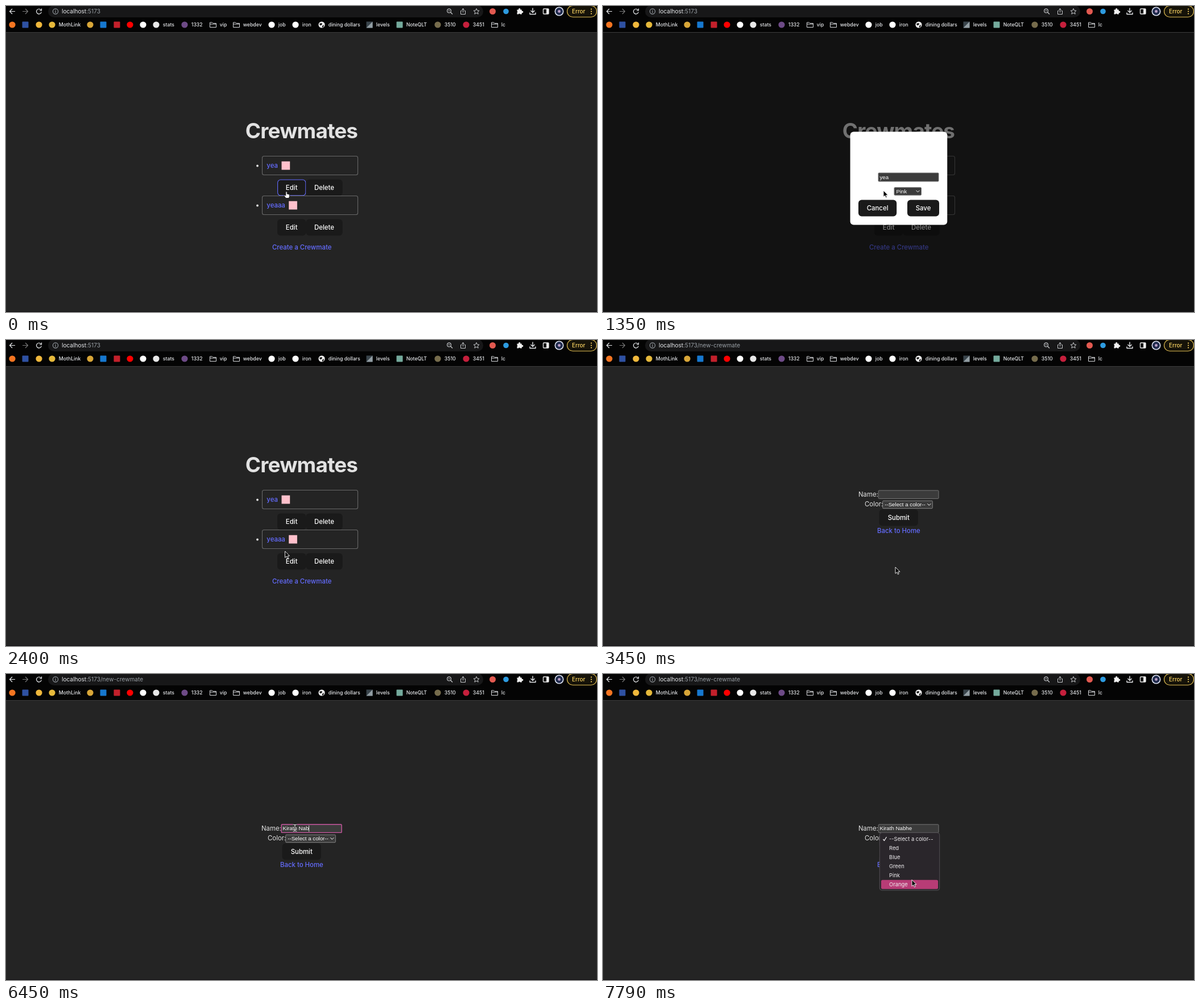
An HTML page that plays this animation: 1039x539 px, repeating every 8 s.

```html
<!DOCTYPE html>
<html lang="en">
<head>
<meta charset="utf-8">
<title>Crewmates</title>
<style>
  html, body { margin: 0; width: 100%; height: 100%; overflow: hidden; background: #242424; }
  svg { display: block; position: absolute; left: 0; top: 0; }
  text { font: 11.4px Inter, sans-serif; fill: #e2e2e2; white-space: pre; }
  .strong { font-weight: 500; }
  .button { font-weight: 500; fill: #fff; text-anchor: middle; }
  .link { font-weight: 500; fill: #646cff; }
  .link.hover { fill: #535bf2; }
  .title { font-size: 36.8px; font-weight: 700; letter-spacing: -.022em; text-anchor: middle; }
  .url { font-size: 10.1px; fill: #9aa0a6; }
  .bookmark { font-size: 8.7px; font-weight: 500; fill: #e8eaed; }
  .field { font: 9.7px "Liberation Sans", Arial, sans-serif; fill: #fff; }
  .option { font-size: 9.4px; fill: #f0eef0; }
</style>
</head>
<body>
<svg width="1039" height="539" viewBox="0 0 1039 539">
  <rect width="1039" height="539" fill="#242424"/>
  <g id="page"></g>
  <g id="chrome"></g>
</svg>
<script>
const LOOP = 8000;
const PINK = '#cc58a2', BLUE = '#646cff';
const byId = id => document.getElementById(id);

const text = (x, y, s, cls = '') => `<text x="${x}" y="${y}" class="${cls}">${s}</text>`;
const rect = (x, y, w, h, fill, r = 0, stroke = 'none', sw = 1) =>
  `<rect x="${x}" y="${y}" width="${w}" height="${h}" rx="${r}" fill="${fill}" stroke="${stroke}" stroke-width="${sw}"/>`;
const circle = (x, y, r, fill, stroke = 'none') =>
  `<circle cx="${x}" cy="${y}" r="${r}" fill="${fill}" stroke="${stroke}" stroke-width="1.1"/>`;
const path = (x, y, d, stroke = '#e8eaed', fill = 'none', sw = 1.2) =>
  `<path transform="translate(${x} ${y})" d="${d}" stroke="${stroke}" fill="${fill}" stroke-width="${sw}" stroke-linejoin="round"/>`;

// Browser toolbar and bookmarks
const ARROW = 'M5 0H-4M0-4.5L-4.5 0 0 4.5';
const FOLDER = 'M-5.5-4H-1.5L0-2.5H5.5V4.5H-5.5ZM-5.5-1H5.5';

const icons = {
  dot: (x, c) => circle(x, 33, 5.6, c),
  box: (x, c) => rect(x - 5.5, 27.5, 11, 11, c, 1),
  folder: x => path(x, 33, FOLDER, '#d5d7da', 'none', 1),
  globe: x => circle(x, 33, 5.6, '#f1f1f1') +
    path(x, 33, 'M-4-2L0-3 1-1-1 1-3 1ZM1 2L4 0 3 4 1 5Z', 'none', '#111'),
  picture: x => rect(x - 5.5, 27.5, 11, 11, '#39444b') +
    path(x, 33, 'M-5.5 5.5L5.5-5.5V5.5Z', 'none', '#929da3'),
};

const bookmarks = [
  ['dot', 11, '#f47521'], ['box', 34, '#2e51a2'], ['dot', 58, '#f0b83c'],
  ['dot', 81, '#e6b93b', 'MothLink'], ['dot', 148, '#d8a638'], ['box', 171, '#1678cf'],
  ['box', 195, '#c3202b'], ['dot', 218, '#f00'], ['dot', 241, '#fff'],
  ['dot', 264, '#e8e8e8', 'stats'], ['dot', 314, '#6d4a86', '1332'],
  ['folder', 364, '', 'vip'], ['folder', 405, '', 'webdev'],
  ['dot', 467, '#fff', 'job'], ['dot', 509, '#fff', 'iron'],
  ['globe', 555, '', 'dining dollars'], ['picture', 639, '', 'levels'],
  ['box', 692, '#74aa9c', 'NoteQLT'], ['dot', 759, '#766c4c', '3510'],
  ['dot', 809, '#c51f3c', '3451'], ['folder', 859, '', 'lc'],
];

const toolbar = route => rect(0, 0, 1039, 46, '#040404') + rect(0, 46, 1039, 1, '#3c3c3c') +
  rect(74, -1, 765, 21, '#171718', 10.5) +
  `<text x="98" y="13.2" class="url"><tspan fill="#e8eaed">localhost</tspan>:5173${route}</text>`;

const toolbarIcons =
  path(11, 9.5, ARROW) + path(34, 9.5, 'M-5 0H4M0-4.5L4.5 0 0 4.5', '#777') +
  path(58, 9.5, 'M3.5-2.5A4.4 4.4 0 1 0 4.3 1M4.5-5V-1.5H1', '#e8eaed') +
  circle(87, 9.5, 4.6, 'none', '#9aa0a6') + path(87, 9.5, 'M0-.5V2.5M0-2.5V-1.3', '#9aa0a6') +
  circle(779, 8.5, 3.4, 'none', '#c8cacd') + path(779, 8.5, 'M-1.6 0H1.6M2.5 2.5L6 6', '#c8cacd') +
  path(803.5, 9.5, 'M-2-1H-4V5H4V-1H2M0 2V-5M-2.3-2.7L0-5 2.3-2.7', '#c8cacd', 'none', 1) +
  path(827, 9.5, 'M0-5L1.5-1.6 5-1.3 2.3 1 3.2 4.7 0 2.7-3.2 4.7-2.3 1-5-1.3-1.5-1.6Z', '#c8cacd', 'none', 1) +
  circle(855.5, 9.5, 5.5, '#e25950') + circle(879, 9.5, 4.8, '#2d9be0') +
  path(903, 9.5, 'M-4.5-3H-1.8A1.7 1.7 0 1 1 1.2-3H3.8V-.5A1.7 1.7 0 1 1 3.8 2.5V5H1A1.6 1.6 0 0 0-2 5H-4.5V2A1.6 1.6 0 0 0-4.5-.6Z', 'none', '#f1f1f1') +
  path(926, 9.5, 'M0-6V2M-3.5-1.5L0 2 3.5-1.5M-5 2V5H5V2', '#e8eaed', 'none', 1.4) +
  rect(944.5, 5, 9.5, 9, 'none', 1, '#f1f1f1', 1.3) + rect(950, 5, 4, 9, '#f1f1f1') +
  circle(972.5, 9.5, 8, '#dfe5f3') + circle(972.5, 9.5, 6.4, '#202b4d') + circle(972.5, 9.5, 2.4, '#b99fc7') +
  rect(986.5, -.5, 52, 20, '#161309', 10, '#d9b64e', 1.2) +
  '<text x="995" y="13" class="strong" style="font-size:9.9px;fill:#fdd663">Error</text>' +
  [5.5, 9.5, 13.5].map(y => circle(1029, y, 1.1, '#fdd663')).join('') +
  bookmarks.map(([kind, x, color, label]) =>
    icons[kind](x, color) + (label ? text(x + 11.8, 36.2, label, 'bookmark') : '')).join('');

// Page widgets
const button = (x, y, w, label, ring) =>
  rect(x, y, w, 29, '#1a1a1a', 5.7) +
  (ring ? rect(x + .6, y + .6, w - 1.2, 27.8, 'none', 5.2, ring, ring === PINK ? 1.4 : 1.1) : '') +
  text(x + w / 2, y + 18.6, label, 'button');

const box = (x, y, w, h, stroke = '#767676', sw = 1) => rect(x, y, w, h, '#3b3b3b', 1.2, stroke, sw);

const select = (x, y, w, label, stroke) => box(x, y, w, 13.5, stroke) +
  text(x + 3.5, y + 10.2, label, 'field') +
  path(x + w - 6, y + 6.6, 'M-3-1.5L0 1.5 3-1.5', '#fff', 'none', 1);

const crewRow = (y, name, swatchX, ring) =>
  circle(442, y + 17.5, 1.9, '#e2e2e2') + rect(450.5, y + .5, 168, 33, 'none', 3, '#686868', 1.1) +
  text(458.3, y + 21.3, name, 'link') + rect(swatchX, y + 9.7, 14.7, 14.8, '#ffc0cb') +
  button(477, y + 41.4, 50.4, 'Edit', ring) + button(527.4, y + 41.4, 64.2, 'Delete');

const homePage = s =>
  text(519.5, 232.6, 'Crewmates', 'title') +
  crewRow(264, 'yea', 484.5, s.edit) + crewRow(334, 'yeaaa', 497.2) +
  text(468, 429.3, 'Create a Crewmate', s.hover ? 'link hover' : 'link') +
  (s.modal ? modal(s) : '');

const modal = s =>
  rect(0, 47, 1039, 492, 'rgba(0,0,0,.5)') + rect(434.6, 221.6, 170.6, 164, '#fff', 6) +
  box(484, 294, 106, 15) + text(486.5, 304.6, 'yea', 'field') +
  select(512, 319.7, 47.5, 'Pink') +
  (s.cancel ? rect(448.3, 340.8, 68.6, 31, '#1a1a1a', 6) : '') +
  button(449, 341.5, 67.2, 'Cancel', s.cancel) + button(535, 341.5, 56, 'Save');

const pen = document.createElement('canvas').getContext('2d');
pen.font = '9.7px "Liberation Sans", Arial, sans-serif';

const formPage = s =>
  text(449, 275.5, 'Name:') + text(460, 293.4, 'Color:') +
  box(484.2, 265, 105.8, 14.4, s.focus ? PINK : '#767676', s.focus ? 1.4 : 1) +
  text(486.5, 275.4, s.name, 'field') +
  (s.caret ? rect(486.5 + pen.measureText(s.name).width, 266.8, .8, 11, '#fff') : '') +
  select(491.7, 283.2, 87.6, '--Select a color--', s.over ? '#a0a0a0' : '#858585') +
  button(485.6, 298.3, 68.4, 'Submit') + text(482, 340.2, 'Back to Home', 'link') +
  (s.row >= 0 ? menu(s.row) : '');

const menu = row =>
  rect(486.3, 279.5, 105.4, 101.5, '#2a262b', 4, '#59555a', .9) +
  rect(489, 282.8 + row * 16, 100, 16, '#b83c76', 2.5) +
  ['--Select a color--', 'Red', 'Blue', 'Green', 'Pink', 'Orange']
    .map((label, i) => text(503, 294 + i * 16, label, 'option')).join('') +
  path(495.5, 290.5, 'M-3 .5L-1 3 3-3.5', '#f0eef0', 'none', 1.3);

const cursors = {
  arrow: (x, y) => path(x, y, 'M0 0V11.3L2.7 8.9 4.4 12.8 6.2 12 4.6 8.2H8Z', '#fff', '#000', .9),
  hand: (x, y) => path(x, y, 'M-1.2 .5Q0-1 1.2 .5V4Q5 3.8 5.5 6V8.5L4.2 11.5H-1L-3.8 7.5Q-4.2 5.5-2.6 6L-1.2 7.2Z', '#111', '#fff', .9),
  beam: (x, y) => [['#111', 2.4], ['#eee', 1.1]].map(([c, w]) =>
    path(x, y, 'M-3.5-6Q0-6 0-4V4Q0 6-3.5 6M3.5-6Q0-6 0-4M3.5 6Q0 6 0 4M-2 2.5H2', c, 'none', w)).join(''),
};

// Each step changes only what it names; everything else carries over.
const at = (cursor, x, y) => ({ cursor, x, y });
const steps = [
  [0, { ...at('hand', 493, 327), edit: BLUE }],
  [150, { edit: PINK }],
  [1200, at('arrow', 493, 325)],
  [1350, { modal: true }],
  [1650, at('arrow', 492, 329)],
  [1800, at('arrow', 490, 336)],
  [1950, { ...at('hand', 487, 347), cancel: BLUE }],
  [2100, at('hand', 485, 351)],
  [2250, { cancel: PINK }],
  [2400, { ...at('arrow', 490.5, 372), modal: false, edit: '' }],
  [2550, at('arrow', 491, 376)],
  [2700, at('arrow', 501, 398)],
  [2850, { ...at('hand', 513, 424), hover: true }],
  [3000, at('hand', 516, 430)],
  [3300, { form: true, name: '', ...at('arrow', 516, 429) }],
  [3450, at('arrow', 514, 400)],
  [3600, at('arrow', 510, 305)],
  [3780, at('beam', 508, 271)],
  [4080, { focus: true, caret: true }],
  [4680, { caret: false }],
  [4980, { name: 'K', caret: true }],
  [5110, { name: 'Kir' }],
  [5260, { name: 'Kirat' }],
  [5410, { name: 'Kirath' }],
  [5860, { caret: false }],
  [6010, { name: 'Kirath ', caret: true }],
  [6150, { name: 'Kirath N' }],
  [6450, { name: 'Kirath Nab' }],
  [6600, { name: 'Kirath Nabhe' }],
  [6740, { ...at('arrow', 543, 291), over: true }],
  [7040, { focus: false, caret: false, row: 0 }],
  [7340, { ...at('arrow', 543, 305), row: 1 }],
  [7490, { ...at('arrow', 543, 327), row: 3 }],
  [7640, { ...at('arrow', 543, 350), row: 4 }],
  [7790, { ...at('arrow', 543, 362.5), row: 5 }],
];

let shown = -1;
function draw(now) {
  const t = now % LOOP;
  const index = steps.findLastIndex(([start]) => start <= t);
  if (index !== shown) {
    shown = index;
    const s = Object.assign({}, ...steps.slice(0, index + 1).map(step => step[1]));
    byId('page').innerHTML = (s.form ? formPage(s) : homePage(s)) +
      rect(0, 538, 1039, 1, '#121014') + cursors[s.cursor](s.x, s.y);
    byId('chrome').innerHTML = toolbar(s.form ? '/new-crewmate' : '') + toolbarIcons;
  }
  requestAnimationFrame(() => draw(performance.now()));
}
draw(performance.now());
</script>
</body>
</html>
```
